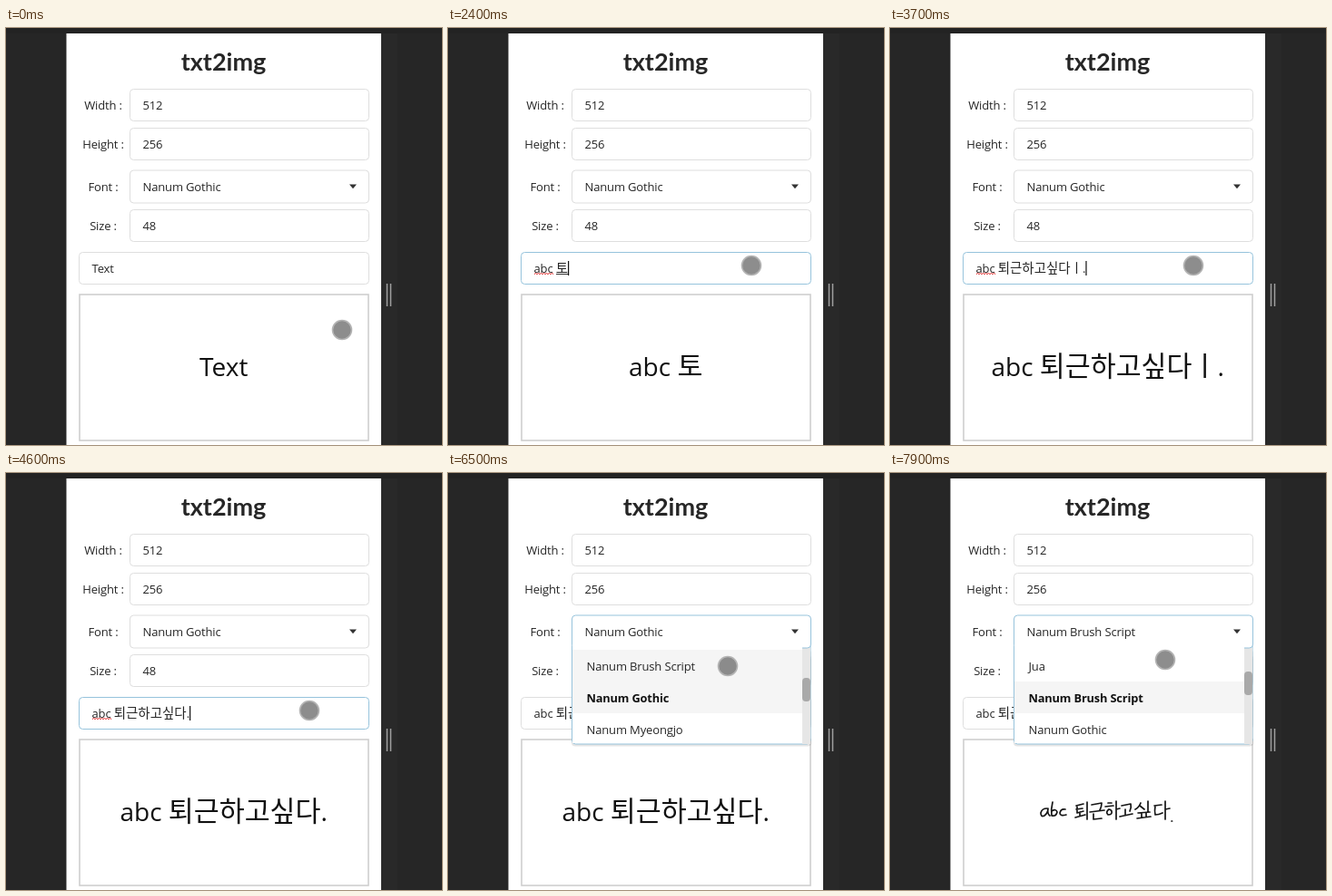
Animation, 480 px wide and 460 px high, one loop 8000 ms. Source, as an HTML page:

```html
<!DOCTYPE html>
<html lang="en">
<head>
<meta charset="utf-8">
<title>txt2img</title>
<style>
  html, body { margin: 0; width: 100%; height: 100%; overflow: hidden; background: #262626; }
  svg { display: block; width: 480px; height: 460px; }
  text { font: 13px "Open Sans", "Noto Sans", sans-serif; letter-spacing: -.15px; fill: #262626; white-space: pre; }
  .k { font-family: "Noto Sans CJK KR", "Noto Sans CJK", sans-serif; font-size: 14.5px; font-weight: 300; letter-spacing: 0; }
  .title { font: bold 27px Lato, sans-serif; letter-spacing: 0; text-anchor: middle; }
  .label, #preview { text-anchor: middle; }
  .box { fill: #fff; stroke: #dedede; }
  .focus { stroke: #96c3dc; }
  #preview { font-size: 28px; letter-spacing: 0; fill: #111; }
  #preview .k { font-size: 30.4px; font-weight: 400; }
  #brush { fill: none; stroke: #151515; stroke-width: 1.7; stroke-linecap: round; stroke-linejoin: round; }
  #menu { transform-origin: 0 192px; }
  .chosen { font-weight: 700; font-size: 12.8px; fill: #111; }
</style>
</head>
<body>
<svg viewBox="0 0 480 460">
  <rect width="480" height="460" fill="#262626"/>
  <rect width="480" height="6" fill="#232323"/>
  <rect x="413" y="6" width="18" height="454" fill="#292929"/>
  <path d="M419.5 282v25M423.5 282v25" stroke="#a0a0a0" stroke-width="1.5"/>
  <rect x="66.5" y="6" width="346.5" height="454" fill="#fff"/>
  <text class="title" x="239.5" y="47">txt2img</text>
  <g id="form"></g>
  <rect id="field" class="box" x="80.5" y="247.5" width="319" height="35" rx="4"/>
  <text id="typed" x="94.5" y="269.5"></text>
  <path id="squiggle" fill="none" stroke="#e23b3b" stroke-width=".9"/>
  <rect id="underline" y="271" width="13" height="1" fill="#333"/>
  <rect id="caret" y="257" width="1.2" height="16" fill="#111"/>
  <rect x="81" y="294" width="318" height="161" fill="#fff" stroke="#cfcfcf" stroke-width="1.6"/>
  <text id="preview" x="239.7" y="384"></text>
  <g id="brush" role="img" aria-label="abc 퇴근하고싶다."></g>
  <g id="menu">
    <rect x="136" y="195" width="264" height="106.5" rx="4" fill="#000" opacity=".1"/>
    <path class="box focus" d="M136.5 190V295q0 4 4 4H395q4 0 4-4V190z"/>
    <g id="rows"></g>
    <rect x="390" y="193" width="9" height="106" fill="#e6e6e6"/>
    <rect id="thumb" x="390" width="9" height="26" rx="4" fill="#a9a9a9"/>
  </g>
  <rect id="select" class="box" x="136.5" y="157" width="263" height="36" rx="4"/>
  <rect id="seam" x="137" y="189" width="253" height="6" fill="#fff"/>
  <text id="font" x="150.5" y="180"></text>
  <path d="M378 172.5h8l-4 4.8z" fill="#333"/>
  <circle id="pointer" r="10.5" stroke-width="1.6"/>
</svg>
<script>
const $ = id => document.getElementById(id);
const show = (id, on) => $(id).style.display = on ? '' : 'none';
const LOOP = 8000, STEP = 100;

const fields = [['Width :', '512', 67.5], ['Height :', '256', 110.5], ['Font :', '', 157.5], ['Size :', '48', 200.5]];
$('form').innerHTML = fields.map(([name, value, y]) =>
  `<text class="label" x="107" y="${y + 22.5}">${name}</text>` +
  `<rect class="box" x="136.5" y="${y}" width="263" height="35" rx="4"/>` +
  `<text x="150.5" y="${y + 22.5}">${value}</text>`).join('');

$('squiggle').setAttribute('d', 'M95 272' + 'l1.5-2 1.5 2'.repeat(7));

// Handwritten glyphs, one path each
$('brush').innerHTML = [
  'M173 370q-6 0-7 5q0 5 4 3q4-3 4-8q-1 6 2 8',
  'M179 363q-2 8-1 15q5 1 6-4q-1-4-6-1',
  'M193 371q-5-1-6 4q0 4 7 2',
  'M205 367l8-2M206 367v8l7-2M205 371l7-1M209 374v4M204 380l11-3M217 363v19',
  'M222 366l11-2q0 4-2 8M220 374l16-2M224 376v6l9-1',
  'M240 364h4M237 368l9-1M241 371q-4 3-1 6q5 0 4-4q-1-2-3-2M249 362v20M249 371l4-1',
  'M255 367l10-2q1 4-1 8M259 371v6M253 379l14-3',
  'M276 364q-2 5-6 7M275 367l5 4M284 362v11M273 375l13-1M277 375v5M282 375v4M272 381l15-2',
  'M291 367l8-1M292 367q-1 6 0 10q4 0 8-2M303 362v20M303 371l5-1',
  'M310 384h.6'
].map(d => `<path d="${d}"/>`).join('');

const typing = [
  [0, 'Text'], [1100, 'Tex'], [1200, 'Te'], [1300, 'T'], [1400, ''], [1600, 'a'], [1700, 'ab'],
  [2000, 'abc'], [2200, 'abc '], [2400, 'abc 토'], [2500, 'abc 퇴'], [2600, 'abc 퇵'],
  [2700, 'abc 퇴그'], [2800, 'abc 퇴근'], [2900, 'abc 퇴근ㅎ'], [3000, 'abc 퇴근하'],
  [3100, 'abc 퇴근하고'], [3200, 'abc 퇴근하곳'], [3300, 'abc 퇴근하고시'], [3400, 'abc 퇴근하고싶'],
  [3500, 'abc 퇴근하고싶다'], [3700, 'abc 퇴근하고싶다ㅣ.'], [4200, 'abc 퇴근하고싶다ㅣ'],
  [4400, 'abc 퇴근하고싶다'], [4600, 'abc 퇴근하고싶다.']
];
const path = [
  [0, 370, 333], [700, 334, 262], [5200, 334, 262], [5700, 318, 177.5], [6100, 318, 177.5],
  [6500, 308, 213], [7000, 308, 213], [7300, 309, 201], [7400, 314, 180], [7700, 314, 180], [7900, 303, 206]
];
const clicks = [[700, 900], [5800, 6000], [6600, 6700], [7400, 7600]];
const fonts = ['Jua', 'Nanum Brush Script', 'Nanum Gothic', 'Nanum Myeongjo'];

const within = (t, a, b) => t >= a && t < b;
const lastOf = (list, t) => list.findLast(k => k[0] <= t);
const clamp = v => Math.max(0, Math.min(1, v));

function pointerAt(t) {
  const a = lastOf(path, t), b = path[path.indexOf(a) + 1] || a;
  const p = a === b ? 0 : (t - a[0]) / (b[0] - a[0]), e = p * p * (3 - 2 * p);
  return [a[1] + (b[1] - a[1]) * e, a[2] + (b[2] - a[2]) * e];
}

function setText(id, s) {
  $(id).innerHTML = s.replace(/[^ -~]+/g, m => `<tspan class="k">${m}</tspan>`);
}

function drawMenu(t, y, brush) {
  const first = t < 7000;
  const open = first ? clamp((t - 5800) / 200) * clamp((6900 - t) / 200) : clamp((t - 7400) / 200);
  show('menu', open > 0);
  show('seam', open > 0);
  $('menu').style.transform = `scaleY(${open})`;
  $('menu').style.opacity = open;
  const hover = first && y > 195 ? 0 : -1;
  $('rows').innerHTML = fonts.slice(first ? 1 : 0).slice(0, 3).map((name, i) => {
    const top = 195 + i * 35, chosen = name === brush;
    const fill = chosen || i === hover ? '#f5f5f5' : '#fff';
    return `<rect x="137" y="${top}" width="253" height="${i === 2 ? 33 : 35}" fill="${fill}"/>` +
      `<text class="${chosen ? 'chosen' : ''}" x="152.5" y="${top + 22.5}">${name}</text>`;
  }).join('');
  $('thumb').setAttribute('y', first ? 226 : 219);
}

function render(t) {
  const [x, y] = pointerAt(t);
  const [since, text] = lastOf(typing, t);
  const focused = within(t, 800, 5900), brushed = t >= 6700;
  const font = brushed ? fonts[1] : fonts[2];

  setText('typed', text);
  setText('preview', text);
  setText('font', font);
  show('preview', !brushed);
  show('brush', brushed);
  $('field').classList.toggle('focus', focused);
  $('select').classList.toggle('focus', t >= 5900);

  const end = 94.5 + (text ? $('typed').getComputedTextLength() : 0);
  $('caret').setAttribute('x', end);
  $('underline').setAttribute('x', end - 13);
  show('caret', focused && Math.floor((t - Math.max(since, 800)) / 500) % 2 === 0);
  show('underline', within(t, 2400, 3700));
  show('squiggle', within(t, 2200, 5900));
  drawMenu(t, y, font);

  const down = clicks.some(([a, b]) => within(t, a, b)), p = $('pointer');
  p.setAttribute('cx', x);
  p.setAttribute('cy', y);
  p.setAttribute('fill', down ? 'rgba(186,182,40,.88)' : 'rgba(112,112,112,.8)');
  p.setAttribute('stroke', down ? '#dedb7c' : '#b4b4b4');
}

const start = performance.now();
let shown = -1;
function tick() {
  const t = Math.floor((performance.now() - start) % LOOP / STEP) * STEP;
  if (t !== shown) render(shown = t);
  requestAnimationFrame(tick);
}
tick();
</script>
</body>
</html>
```
